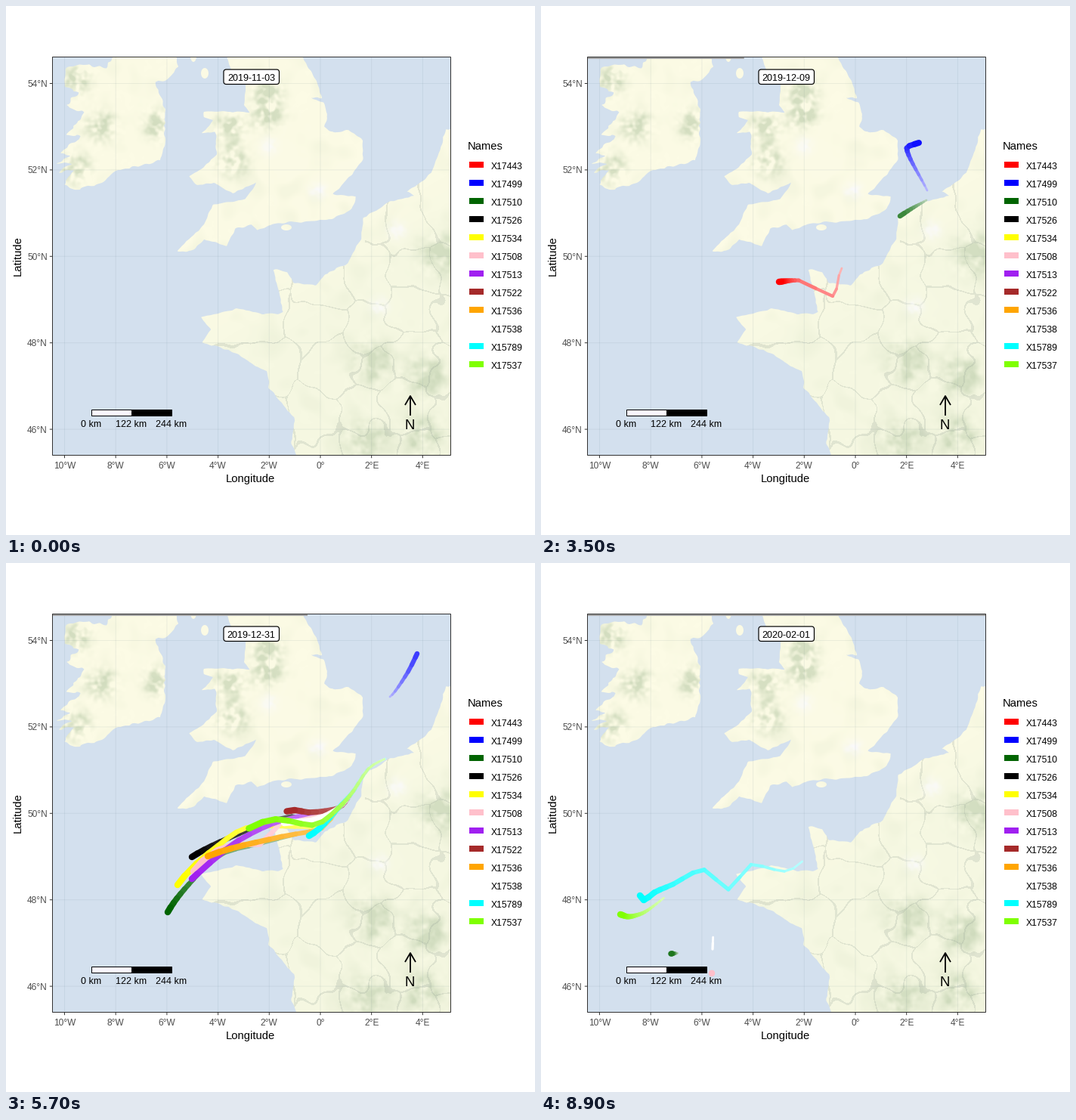
A matplotlib script for the animation above (9000 ms loop, 700 by 700 pixels).

```python
import numpy as np
import matplotlib.pyplot as plt
from matplotlib.animation import FuncAnimation
from matplotlib.collections import LineCollection
from matplotlib.colors import to_rgb
from matplotlib.patches import FancyBboxPatch, Rectangle
from matplotlib.path import Path

plt.rcParams["font.family"] = "Liberation Sans"
plt.rcParams["path.snap"] = False

SIZE, DPI, FRAMES = 700, 100, 90
PX = 72 / DPI
X0, X1, Y0, Y1 = 61.5, 588.5, 67.5, 594.5
TAIL, YOUNG = 18, 12
WIDE, THIN, FADE = 8.5, 2.8, 0.7
SEA, DARK, GREY, GRID = "#d3e0ee", "#333333", "#4d4d4d", "#4a6a7a"

rng = np.random.default_rng(7)
fig = plt.figure(figsize=(SIZE / DPI, SIZE / DPI), dpi=DPI, facecolor="white")
ax = fig.add_axes([0, 0, 1, 1])
ax.axis("off")


def label(x, y, text, px, color="black", ha="center", va="baseline", **kw):
    return ax.text(x, y, text, fontsize=px * PX, color=color, ha=ha, va=va, zorder=8, **kw)


def stroke(xs, ys, color, px, z=3, **kw):
    return ax.plot(xs, ys, color=color, lw=px * PX, zorder=z,
                   solid_capstyle="butt", **kw)[0]


def box(x, y, w, h, fill, edge, z, px=1.0):
    return ax.add_patch(Rectangle((x, y), w, h, fc=fill, ec=edge, lw=px * PX, zorder=z))


# ---- land: a few corner points, roughened along the shore ------------------
def coast(points, rough):
    p = np.array(points + points[:1], float)
    s = np.r_[0, np.cumsum(np.hypot(*np.diff(p, axis=0).T))]
    u = np.arange(0, s[-1], 2)
    shore = np.column_stack([np.interp(u, s, c) for c in p.T])
    wobble = rng.standard_normal((len(u), 2))
    for c in wobble.T:
        c[:] = np.convolve(c, np.hanning(7) / 2, "same")
    shore += rough * wobble
    return Path(np.vstack([shore, shore[:1]]), closed=True)


def islet(x, y, rx, ry):
    a = np.linspace(0, 2 * np.pi, 24)
    return Path(np.column_stack([x + rx * np.cos(a), y + ry * np.sin(a)]), closed=True)


britain = [
    (290, 50), (298, 85), (318, 98), (315, 130), (323, 141), (300, 140), (262, 140),
    (262, 148), (274, 151), (259, 169), (277, 167), (279, 196), (262, 213), (242, 225),
    (253, 237), (275, 234), (300, 248), (331, 234), (317, 256), (273, 264), (262, 290),
    (226, 325), (245, 325), (262, 309), (292, 317), (304, 294), (325, 290), (332, 297),
    (352, 288), (430, 283), (458, 269), (463, 253), (432, 249), (450, 231), (472, 204),
    (472, 178), (455, 164), (434, 168), (421, 160), (426, 150), (420, 128), (400, 121),
    (418, 123), (411, 100), (382, 50),
]
ireland = [
    (152, 50), (131, 82), (96, 76), (78, 86), (78, 108), (94, 115), (80, 132),
    (104, 142), (80, 171), (100, 171), (72, 193), (84, 200), (66, 208), (86, 208),
    (70, 221), (90, 217), (75, 237), (92, 244), (118, 238), (150, 217), (206, 205),
    (211, 172), (209, 135), (197, 101), (213, 96), (229, 80), (222, 50),
]
continent = [
    (620, 160), (582, 163), (574, 190), (563, 220), (546, 236), (530, 246), (541, 251),
    (510, 258), (473, 280), (470, 308), (452, 340), (421, 356), (410, 370), (380, 366),
    (371, 351), (354, 349), (367, 406), (338, 408), (309, 400), (258, 412), (270, 428),
    (259, 445), (295, 455), (331, 477), (346, 484), (347, 505), (382, 545), (378, 575),
    (392, 620), (620, 620),
]
outline = Path.make_compound_path(
    coast(britain, .7), coast(ireland, 1.2), coast(continent, .7),
    islet(263, 89, 5, 7), islet(371, 293, 7, 4), islet(248, 66, 4, 8))

N = 527
gx, gy = np.meshgrid(np.linspace(X0, X1, N), np.linspace(Y0, Y1, N))


def noise(s):
    f = np.fft.fftfreq(N)
    k = np.exp(-2 * (np.pi * s) ** 2 * (f[:, None] ** 2 + f ** 2))
    n = np.fft.ifft2(np.fft.fft2(rng.standard_normal((N, N))) * k).real
    return n / n.std()


def spots(r, *centres):
    return sum(np.exp(-((gx - x) ** 2 + (gy - y) ** 2) / r ** 2) for x, y in centres)


def blend(img, color, a):
    a = np.clip(a, 0, 1)[..., None]
    return img * (1 - a) + np.array(color) * a


def provinces():
    """Faint borders: edges between the cells of a jittered grid."""
    wx, wy = gx + 5 * noise(8), gy + 5 * noise(8)
    seeds = [(x, y) + rng.uniform(-18, 18, 2)
             for x in range(350, 640, 62) for y in range(290, 640, 62)]
    d = np.sort([np.hypot(wx - x, wy - y) for x, y in seeds], axis=0)
    return (d[1] - d[0] < 2) * ((gy > 345) | (gx > 475))


south = np.clip((gy - 270) / 120 + (gx - 440) / 200, 0, 1)
hills = (spots(18, (92, 98), (90, 215), (203, 157), (125, 160), (295, 160), (300, 205),
               (345, 115), (345, 145))
         + spots(26, (485, 472), (555, 490), (475, 575), (550, 570), (575, 330)))
fine, soft = noise(2), noise(5)
relief = .35 + .2 * soft + .2 * fine * (1 - .6 * south)
ground = blend(np.full((N, N, 3), [252., 251, 229]), (246, 248, 226), south)
ground = blend(ground, (176, 196, 160), np.clip(hills * relief, 0, .5) + .04 * np.clip(noise(8), 0, 2))
ground = blend(ground, (150, 162, 150), .22 * provinces())
ground = blend(ground, (250, 250, 251),
               spots(11, (413, 245), (494, 398), (348, 186), (517, 297)) * (.75 + .2 * fine))

box(X0, Y0, X1 - X0, Y1 - Y0, SEA, "none", 0)
land = ax.imshow(np.clip(ground / 255, 0, 1), extent=(X0, X1, Y1, Y0), aspect="auto", zorder=1)
land.set_clip_path(outline, ax.transData)
box(X0, Y0, X1 - X0, Y1 - Y0, "none", DARK, 7)
ax.set_xlim(0, SIZE)
ax.set_ylim(SIZE, 0)

# ---- axes, scale, compass, legend ------------------------------------------
for lon in range(-10, 5, 2):
    x = 416 + 33.85 * lon
    side = "W" if lon < 0 else "E" if lon else ""
    stroke([x, x], [Y0, Y1], GRID, 1, alpha=.09)
    stroke([x, x], [Y1, Y1 + 3.7], DARK, 1)
    label(x, 612, f"{abs(lon)}°{side}", 11.9, GREY)
for lat in range(46, 55, 2):
    y = 102.5 + 57.2 * (54 - lat)
    stroke([X0, X1], [y, y], GRID, 1, alpha=.09)
    stroke([X0 - 3.7, X0], [y, y], DARK, 1)
    label(55, y + 4.5, f"{lat}°N", 11.9, GREY, "right")
label(323.5, 630, "Longitude", 14.8)
label(15.5, 331, "Latitude", 14.8, va="center", rotation=90)

for x, fill in ((113.5, "#fbf8ff"), (166.5, "black")):
    box(x, 534.5, 53, 8, fill, "black", 6)
for x, km in ((113, 0), (166, 122), (218.5, 244)):
    label(x, 557, f"{km} km", 12.5)
stroke([535, 535], [542, 516], "black", 1.8, 6)
stroke([528, 535, 542], [528, 516, 528], "black", 1.8, 6)
label(534.5, 560.5, "N", 18.5)

legend = {
    "X17443": "red", "X17499": "blue", "X17510": "darkgreen", "X17526": "black",
    "X17534": "yellow", "X17508": "pink", "X17513": "#a020f0", "X17522": "brown",
    "X17536": "orange", "X17538": "white", "X15789": "cyan", "X17537": "chartreuse",
}
label(611, 190, "Names", 14.8, ha="left")
for i, (name, color) in enumerate(legend.items()):
    y = 210 + 24 * i
    stroke([613, 632], [y, y], color, 8)
    label(642, y + 5.5, name, 12.1, ha="left")

ax.add_patch(FancyBboxPatch((291, 87), 67.5, 13.5, boxstyle="round,pad=3,rounding_size=3.5",
                            fc="white", ec="black", lw=1.2 * PX, zorder=7))
date = label(324.5, 98.8, "", 12.5)
bar = stroke([], [], "#a0a0a0", 2, 6.5)

# ---- tracks: smooth paths through a few (day, x, y) keys -------------------
LANE = [(508, 256), (482, 270), (458, 304), (440, 324)]
tracks = []


def glide(keys):
    """Monotone cubic path, sampled once per step."""
    k = np.array(keys, float)
    t, p = k[:, 0], k[:, 1:]
    h = np.diff(t)[:, None]
    d = np.diff(p, axis=0) / h
    prod, total = d[:-1] * d[1:], d[:-1] + d[1:]
    inner = np.where(prod > 0, 2 * prod / np.where(prod > 0, total, 1), 0)
    m = np.vstack([d[:1], inner, d[-1:]])
    s = np.arange(t[0], t[-1] + 1)
    j = np.clip(np.searchsorted(t, s, "right") - 1, 0, len(h) - 1)
    u, h = ((s - t[j]) / h[j, 0])[:, None], h[j]
    return (p[j] + (p[j + 1] - p[j]) * u * u * (3 - 2 * u)
            + h * u * (1 - u) * (m[j] * (1 - u) - m[j + 1] * u))


def track(color, *keys, lane=None):
    """Add a bird; lane gives the days it enters and leaves the shared strait."""
    if lane:
        keys = [(t, *p) for t, p in zip(np.linspace(*lane, len(LANE)), LANE)] + list(keys)
    tracks.append((np.array(to_rgb(color)), int(keys[0][0]), glide(keys)))


track("red", (0, 508, 257), (4, 464, 281), (9, 440, 301), (14, 416, 351), (17, 398, 347),
      (20, 386, 384), (22, 341, 363), (30, 315, 365))
track("blue", (23, 511, 244), (32, 484, 188), (35, 500, 181), (39, 508, 177),
      (45, 532, 144), (48, 544, 120), (50, 544, 120))
track("darkgreen", (26, 510, 257), (35, 475, 278), (39, 420, 346), (43, 340, 371),
      (46, 289, 384), (49, 255, 411), (57, 214, 462), (61, 203, 487), (68, 184, 516),
      (82, 172, 517))
track("black", (45, 416, 341), (47, 378, 335), (49, 336, 347), (57, 246, 389),
      (68, 190, 433), lane=(36, 43))
track("yellow", (45, 418, 350), (47, 382, 349), (49, 334, 348), (54, 268, 384),
      (57, 227, 426), (68, 202, 478), lane=(36, 43))
track("pink", (47, 410, 334), (50, 365, 342), (52, 336, 372), (54, 300, 373),
      (57, 248, 408), (63, 225, 480), (70, 226, 541), (86, 226, 543), lane=(36, 44))
track("#a020f0", (46, 425, 327), (49, 365, 341), (53, 308, 367), (57, 246, 418),
      (63, 247, 418), lane=(36, 44))
track("brown", (54, 400, 330), (56, 382, 327), (62, 314, 358), lane=(37, 50))
track("orange", (48, 418, 351), (51, 365, 362), (57, 267, 388), (59, 240, 407),
      (62, 194, 399), (65, 172, 384), (68, 155, 350), lane=(37, 46))
track("white", (54, 402, 341), (57, 368, 344), (59, 322, 358), (63, 260, 394),
      (65, 240, 419), (68, 229, 468), (73, 227, 511), lane=(38, 50))
track("cyan", (55, 415, 351), (57, 401, 361), (68, 371, 369), (73, 322, 408),
      (76, 278, 399), (78, 248, 432), (80, 216, 406), (83, 175, 425), (86, 150, 436),
      (88, 136, 446), (89, 131, 440), lane=(38, 51))
track("chartreuse", (52, 405, 347), (55, 357, 339), (58, 305, 359), (63, 240, 385),
      (68, 180, 430), (79, 130, 465), (84, 116, 468), (89, 105, 465), lane=(38, 49))

trails = LineCollection([], capstyle="round", zorder=5)
ax.add_collection(trails, autolim=False)


def draw(i):
    segs, widths, colors = [], [], []
    for rgb, start, pos in tracks:
        # the oldest point in the window is the thinnest and palest
        pts = pos[max(0, i - TAIL - start):max(0, i + 1 - start)]
        for k in range(len(pts) - 1):
            f = k / np.clip(len(pts) - 2, YOUNG, TAIL - 1)
            white = FADE * (1 - f)
            segs.append(pts[k:k + 2])
            widths.append((THIN + (WIDE - THIN) * f) * PX)
            colors.append(rgb * (1 - white) + white)
    trails.set_segments(segs)
    trails.set_linewidths(widths or [1])
    trails.set_color(colors or ["none"])
    p = i / (FRAMES - 1)
    bar.set_data([X0, X0 + p * (X1 - X0)], [69, 69])
    date.set_text(str(np.datetime64("2019-11-03") + int(i + p + .65)))
    return trails, bar, date


anim = FuncAnimation(fig, draw, frames=FRAMES, interval=100, repeat=True, repeat_delay=0)
plt.show()
```
